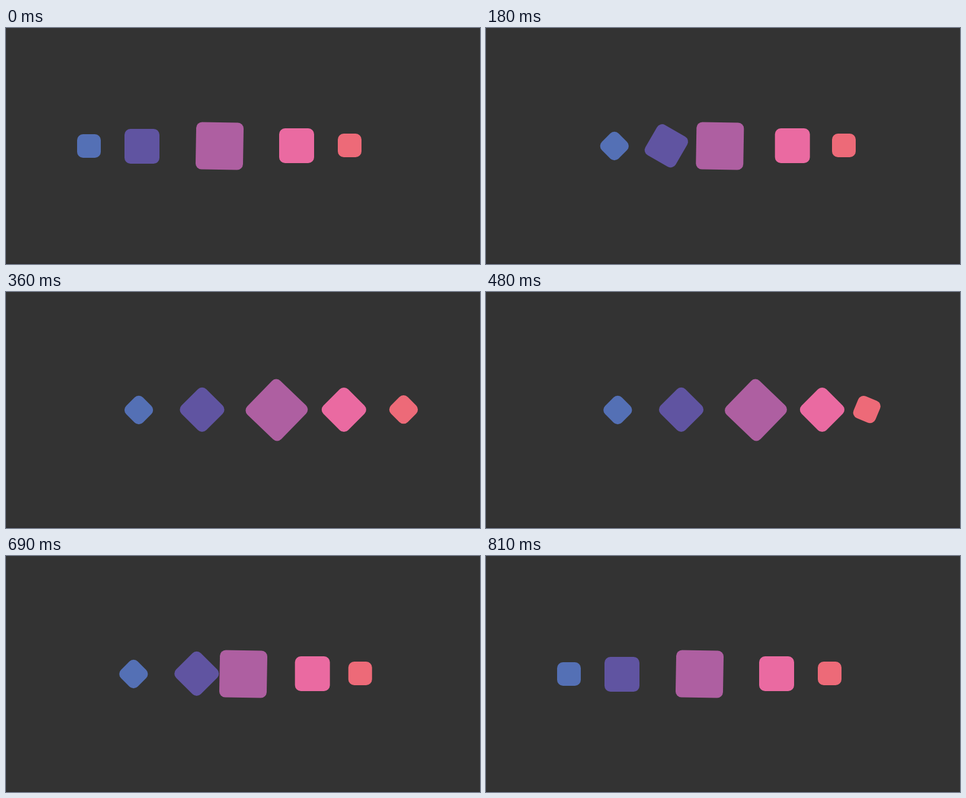
An HTML page for the animation above (0.84 s loop, 800 by 400 pixels).

```html
<!DOCTYPE html>
<html lang="en">
<head>
<meta charset="utf-8">
<title>Sliding squares</title>
<style>
  html, body { margin: 0; width: 100%; height: 100%; overflow: hidden; background: #333; }
  svg { display: block; width: 800px; height: 400px; }
</style>
</head>
<body>
<svg id="stage" viewBox="0 0 800 400">
  <rect width="800" height="400" fill="#333"/>
  <rect y="398" width="800" height="2" fill="#2f2e30"/>
</svg>
<script>
const STEP = 30, STEPS = 28, PEAK = 13, END = 27;
const NUDGE = 40, DRIFT = 11;

// x: rest centre, top: furthest centre, y/a: [rest, turned],
// out/back: steps at which each quick turn starts and ends
const squares = [
  { size: 40, fill: '#5470b5', x: 140,   top: 225.3, y: [200, 200],     a: [0, 45], out: [1, 4],   back: [24, 25] },
  { size: 59, fill: '#6054a1', x: 229.5, top: 332.8, y: [200.5, 199.4], a: [0, 45], out: [4, 7],   back: [23, 24] },
  { size: 80, fill: '#ae5fa1', x: 360.5, top: 459.6, y: [200, 200],     a: [1, 44], out: [7, 9],   back: [21, 23] },
  { size: 59, fill: '#ea6aa1', x: 490.5, top: 574,   y: [199.5, 199.5], a: [0, 45], out: [9, 10],  back: [18, 21] },
  { size: 40, fill: '#ed6a78', x: 580,   top: 676.5, y: [199, 199.2],   a: [0, 45], out: [10, 11], back: [14, 18] }
];

const stage = document.getElementById('stage');

for (const s of squares) {
  s.el = document.createElementNS('http://www.w3.org/2000/svg', 'rect');
  const attrs = { x: -s.size / 2, y: -s.size / 2, width: s.size, height: s.size, rx: 10, fill: s.fill };
  for (const key in attrs) s.el.setAttribute(key, attrs[key]);
  stage.append(s.el);

  // each key: step, x, amount turned
  const near = s.x + NUDGE, far = s.top - DRIFT;
  s.keys = [
    [0, s.x, 0], [s.out[0], near, 0], [s.out[1], far, 1], [PEAK, s.top, 1],
    [s.back[0], far, 1], [s.back[1], near, 0], [END, s.x, 0]
  ];
}

const mix = (a, b, p) => a + (b - a) * p;

function pose(keys, t) {
  const i = Math.max(1, keys.findIndex(k => k[0] >= t));
  const [t0, x0, r0] = keys[i - 1], [t1, x1, r1] = keys[i];
  const p = (t - t0) / (t1 - t0);
  return [mix(x0, x1, p), mix(r0, r1, p)];
}

function draw(ms) {
  const t = Math.floor(ms / STEP) % STEPS;
  for (const s of squares) {
    const [x, turn] = pose(s.keys, t);
    s.el.setAttribute('transform', `translate(${x} ${mix(...s.y, turn)}) rotate(${mix(...s.a, turn)})`);
  }
}

let start;
function tick(now) {
  start ??= now;
  draw(Math.max(0, now - start));
  requestAnimationFrame(tick);
}
draw(0);
requestAnimationFrame(tick);
</script>
</body>
</html>
```
